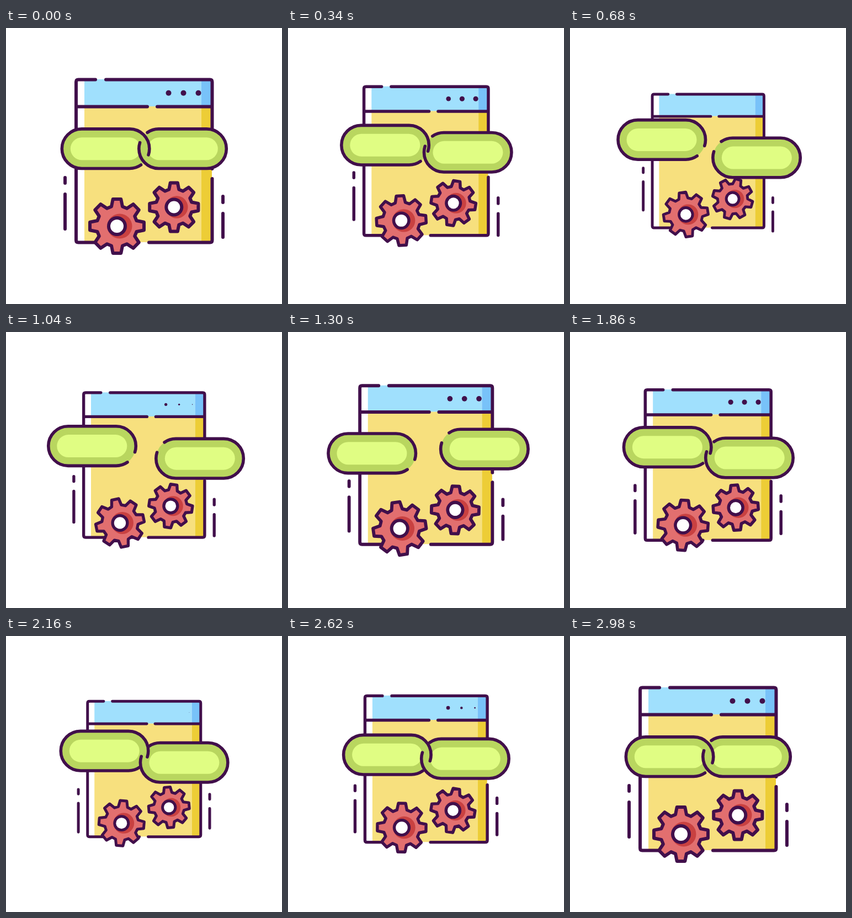
These frames come from a looping animation (500 px wide and 500 px high, 3000 ms). An HTML page with a canvas:

```html
<!DOCTYPE html>
<html>
<head>
<meta charset="utf-8">
<style>
html, body { margin: 0; width: 100%; height: 100%; overflow: hidden; background: #fff; }
canvas { display: block; }
</style>
</head>
<body>
<canvas id="stage" width="500" height="500"></canvas>
<script>
const ctx = document.getElementById('stage').getContext('2d');
const LOOP = 3000, TAU = 2 * Math.PI, INK = '#410f4b';
const CX = 250.3, CY = 241;
let t = 0;

const clamp = v => Math.min(1, Math.max(0, v));

// Eased 0 to 1 between two times
function move(from, to) {
  const p = clamp((t - from) / (to - from));
  return p * p * (3 - 2 * p);
}

// Eased 0 to 1 and back
const hop = (from, peak, to) => move(from, peak) - move(peak, to);

// Two pulses per loop, the first slightly early and the second slightly late
function beat(delay = 0) {
  const warped = t + 35 * Math.sin(TAU * t / LOOP) - delay;
  return Math.cos(2 * TAU * warped / LOOP);
}

function rect(color, x0, y0, x1, y1) {
  ctx.fillStyle = color;
  ctx.fillRect(x0, y0, x1 - x0, y1 - y0);
}

function disc(color, x, y, r) {
  ctx.fillStyle = color;
  ctx.beginPath();
  ctx.arc(x, y, r, 0, TAU);
  ctx.fill();
}

function pill(color, x, y, w, h) {
  ctx.fillStyle = color;
  ctx.beginPath();
  ctx.roundRect(x, y, w, h, h / 2);
  ctx.fill();
}

function stroke(path) {
  ctx.lineWidth = 6;
  ctx.stroke(new Path2D(path));
}

function page() {
  rect('#fff', 127, 93, 142, 388);
  rect('#a0e0fd', 142, 93, 354, 142);
  rect('#78c2f9', 354, 93, 373, 142);
  rect('#f7e07e', 142, 142, 354, 388);
  rect('#edcd36', 354, 142, 373, 388);
  stroke('M162 93.5H131Q127 93.5 127 97.5V384.5Q127 388.5 131 388.5H240' +
    'M259 388.5H369.5Q373.5 388.5 373.5 384.5V273' +
    'M373.5 255V97.5Q373.5 93.5 369.5 93.5H181' +
    'M127 142.5H256M274 142.5H373.5');
  for (let i = 0; i < 3; i++) {
    disc(INK, 294.5 + 27 * i, 117.7, 5 * clamp(.88 + 1.25 * beat(45 * i)));
  }
}

function bars(x, bob, path) {
  ctx.save();
  ctx.translate(x, bob);
  stroke(path);
  ctx.restore();
}

function gear(x, y, k, hub, turn) {
  ctx.save();
  ctx.translate(x, y);
  ctx.save();
  ctx.rotate(turn * TAU / 360);
  ctx.beginPath();
  for (let i = 0; i < 8; i++) {
    for (const [px, py] of [[-10, -35.5], [-7.3, -49], [7.3, -49], [10, -35.5]]) {
      ctx.lineTo(px * k, py * k);
    }
    ctx.rotate(TAU / 8);
  }
  ctx.closePath();
  ctx.fillStyle = '#e26f6f';
  ctx.fill();
  ctx.lineWidth = 6;
  ctx.stroke();
  ctx.restore();
  disc('#c94141', 5, 0, 22.5 * k);
  disc(INK, 0, 0, hub + 3);
  disc('#fff', 0, 0, hub - 3);
  ctx.restore();
}

// The right link (side 1) is the left one (side -1) turned half round.
function onLink(side, reach, dip, draw) {
  const x = reach * (hop(0, 1360, 1950) + .08 * hop(1360, 1950, LOOP));
  const y = 17.8 * hop(0, 830, 1495) - dip * hop(830, 1495, 1950) + 11.8 * hop(1495, 1950, LOOP);
  ctx.save();
  ctx.translate(CX + side * x, 218.7 + side * y);
  ctx.scale(-side, -side);
  draw();
  ctx.restore();
}

function linkFill() {
  pill('#b9d65f', -149, -35.8, 158.5, 71.6);
  pill('#e0fd83', -133.5, -20.5, 127, 41);
}

function linkEdge() {
  const r = 35.8, deg = TAU / 360;
  ctx.lineWidth = 5.6;
  ctx.beginPath();
  ctx.arc(-26.3, 0, r, 55 * deg, 90 * deg);
  ctx.arc(-113.2, 0, r, 90 * deg, 270 * deg);
  ctx.arc(-26.3, 0, r, -90 * deg, 18 * deg);
  ctx.stroke();
}

function frame(now) {
  t = now % LOOP;
  const scale = .91 + .09 * beat();
  rect('#fff', 0, 0, 500, 500);
  ctx.strokeStyle = INK;
  ctx.lineCap = ctx.lineJoin = 'round';

  ctx.save();
  ctx.translate(CX, CY);
  ctx.scale(scale, scale);
  ctx.translate(-CX, -CY);
  page();
  bars(107, 14.5 * (hop(1350, 2150, 2850) - hop(0, 700, 1350)), 'M0 271V281M0 301V364');
  bars(393, 17 * hop(0, 650, 1300) - 10 * hop(1560, 2300, LOOP), 'M0 305V316M0 336V379');
  gear(201, 359, 1, 15, 5.3 * hop(1000, 2050, 2800) - 11.5 * hop(0, 1000, 2050));
  gear(304.3, 324.5, .9, 14,
    16 * hop(0, 650, 1450) - 5.5 * hop(1450, 2100, 2600) + 9 * hop(2100, 2600, LOOP));
  ctx.restore();

  for (const draw of [linkFill, linkEdge]) {
    onLink(-1, 28.5, 6, draw);
    onLink(1, 36, 13, draw);
  }
  requestAnimationFrame(frame);
}
requestAnimationFrame(frame);
</script>
</body>
</html>
```
